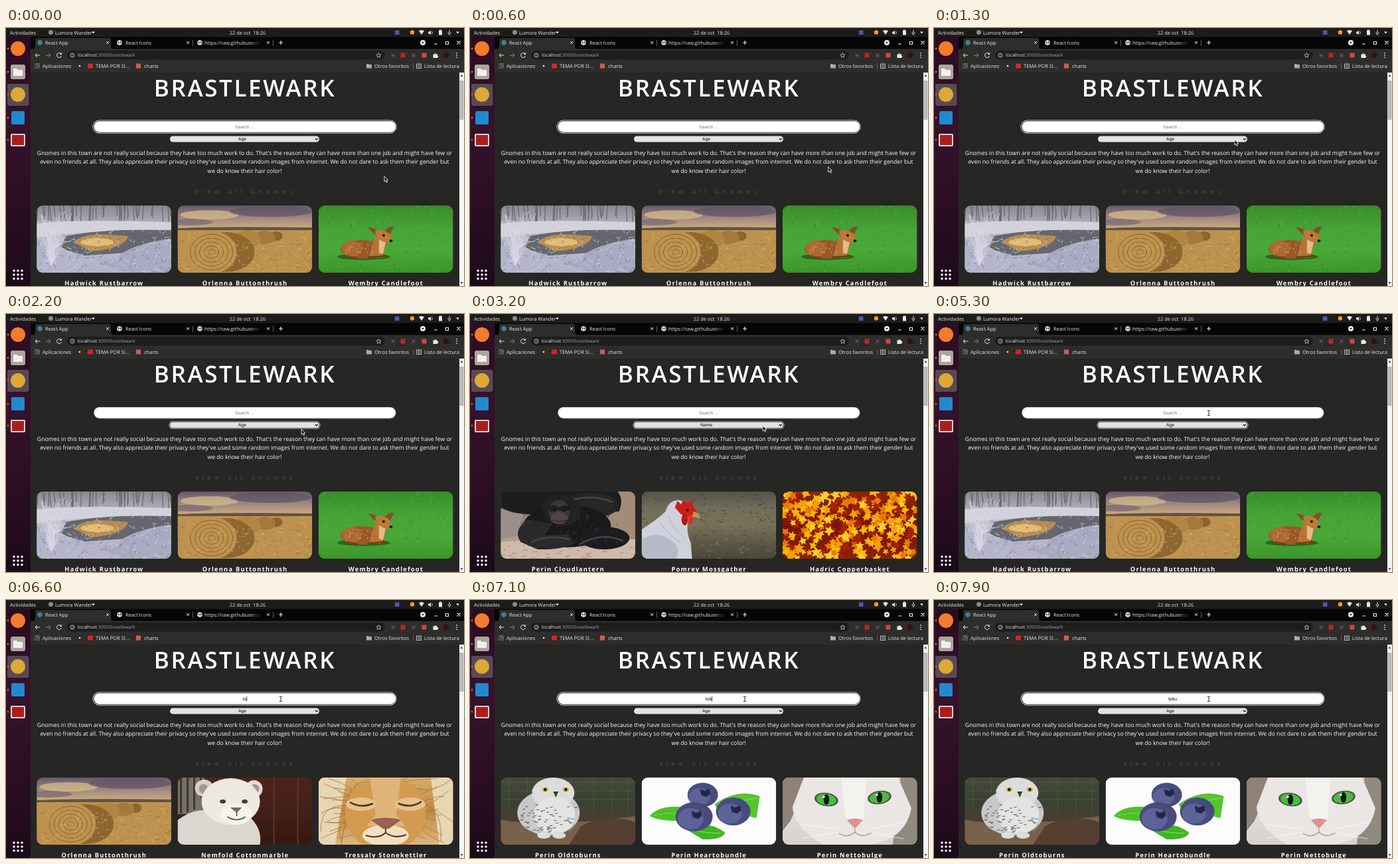
An HTML page that plays this animation: 690x388 px, repeating every 8 s.

```html
<!DOCTYPE html>
<html lang="es">
<head>
<meta charset="utf-8">
<title>Brastlewark</title>
<style>
html, body { margin: 0; width: 100%; height: 100%; overflow: hidden; background: #262624; }
svg { display: block; width: 690px; height: 388px; }
text { font: 7.5px 'Open Sans', 'Noto Sans', sans-serif; fill: #e8e8e8; text-rendering: geometricPrecision; white-space: pre; }
.bar { font-size: 7.4px; }
.mid { text-anchor: middle; }
.title { font-size: 35px; font-weight: 600; letter-spacing: 2.6px; fill: #fff; }
.intro { font-size: 8.63px; fill: #fff; }
.view { font-size: 8.5px; letter-spacing: 5.8px; fill: #51514e; }
.name { font-size: 9.4px; font-weight: 700; letter-spacing: 1.2px; fill: #fff; }
.field { font: 6.73px 'Liberation Sans', Arial, sans-serif; fill: #000; }
.line { fill: none; stroke: #e8e8e8; }
</style>
</head>
<body>
<svg viewBox="0 0 690 388">
  <defs>
    <linearGradient id="dockFill" x2="0" y2="1">
      <stop stop-color="#2a0d20"/><stop offset=".35" stop-color="#36122d"/><stop offset=".7" stop-color="#2a0d24"/><stop offset="1" stop-color="#1b0a18"/>
    </linearGradient>
    <linearGradient id="fade"><stop offset=".8" stop-color="#e8e8e8"/><stop offset="1" stop-color="#e8e8e8" stop-opacity="0"/></linearGradient>
    <clipPath id="card"><rect width="202.5" height="101" rx="9"/></clipPath>
  </defs>
  <rect width="690" height="388" fill="#262624"/>

  <!-- page -->
  <text class="title mid" x="360" y="103">BRASTLEWARK</text>
  <g id="searchRing"><rect x="130.5" y="138.5" width="458" height="20" rx="10" fill="#fff"/><rect x="131.3" y="139.3" width="456.4" height="18.4" rx="9.2" fill="#101010"/></g>
  <rect x="132.5" y="140.5" width="455" height="17" rx="8.5" fill="#8d8d8b"/>
  <rect x="132.5" y="140.2" width="454.5" height="16.2" rx="8.1" fill="#fff"/>
  <text id="query" class="field mid" x="359.5" y="151"></text>
  <rect id="caret" y="145" width=".7" height="7.5"/>
  <g id="selectRing"><rect x="245.5" y="161" width="228" height="12" rx="6" fill="#fff"/><rect x="246.1" y="161.6" width="226.8" height="10.8" rx="5.4" fill="#101010"/></g>
  <rect x="247" y="162.5" width="225" height="9" rx="4.5" fill="#e0e3df"/>
  <text id="sort" class="field mid" x="356" y="169.4"></text>
  <path d="M466 166l2 2 2-2" fill="none" stroke="#111" stroke-width="1.1"/>
  <g class="mid">
    <text class="intro" x="359.5" y="191">Gnomes in this town are not really social because they have too much work to do. That's the reason they can have more than one job and might have few or</text>
    <text class="intro" x="359.5" y="204.3">even no friends at all. They also appreciate their privacy so they've used some random images from internet. We do not dare to ask them their gender but</text>
    <text class="intro" x="359.5" y="217.5">we do know their hair color!</text>
  </g>
  <text class="view" x="285" y="249">View all Gnomes</text>
  <g id="cards"></g>
  <path d="M683 67h7v321h-7z" fill="#f4f4f4"/><path d="M683.5 79h6v59h-6z" fill="#b9b9b9"/>
  <path d="M684.5 73l2-3 2 3zM684.5 382l2 3 2-3z" fill="#444"/>

  <!-- browser -->
  <path d="M37 13h653v19H37z" fill="#060606"/>
  <path d="M37 31.5h5q2-1 2-4V18q0-3 3-3h108q3 0 3 3v9.5q0 3 3 4h529V67H37z" fill="#2d2d2c"/>
  <path d="M281.5 18v9M402.5 18v9M613.5 53v9" stroke="#5b5c60"/>
  <circle cx="51" cy="22" r="3.7" fill="#3d8195"/>
  <text class="bar" x="59" y="24.8">React App</text>
  <text class="bar" x="180" y="24.8">React Icons</text>
  <text class="bar" x="299" y="24.8" style="fill:url(#fade)">https://raw.githubuserco</text>
  <g id="marks"></g>
  <path class="line" d="M411 22h6M414 19v6M645 24h5M662.5 20.5h4v4h-4zM679.5 19.5l5 5m0-5l-5 5" stroke-width="1.2"/>
  <circle cx="628" cy="22" r="4" fill="#e8e8e8"/><path d="M626 21h4l-2 2.5z" fill="#222"/>
  <path class="line" d="M51 41h-7m3-3l-3 3 3 3M83 39a3.5 3.5 0 1 0 .5 3M83.5 37v2.5h-2.5"/>
  <path class="line" d="M60 41h7m-3-3l3 3-3 3" style="stroke:#88898c"/>
  <rect x="92" y="34" width="479" height="13.5" rx="6.7" fill="#1d1d1c"/>
  <circle class="line" cx="100" cy="41" r="3" stroke-width=".8"/><path class="line" d="M100 40.5v2M100 39v.7" stroke-width=".8"/>
  <text x="108" y="43.4" style="font-size:6.9px">localhost<tspan fill="#9aa0a6">:3000/brastlewark</tspan></text>
  <path class="line" d="M561.5 37.5l1 2.4 2.5.2-1.9 1.7.6 2.5-2.2-1.4-2.2 1.4.6-2.5-1.9-1.7 2.5-.2z" stroke-width=".7"/>
  <path d="M581 39h5v4h-5zM611.5 38.5h5v5h-5z" fill="#4b4b4d"/>
  <path d="M594.5 37.5h7v7h-7z" fill="#c02323"/>
  <path d="M626.5 37.5h7v7h-7z" fill="#d14545"/>
  <path d="M643.5 39.5h2a1.3 1.3 0 1 1 2.6 0h2v2a1.3 1.3 0 1 1 0 2.6v1h-6.6z" fill="#e8e8e8"/>
  <circle cx="663" cy="41" r="4.5" fill="#35100f"/>
  <path d="M679 37v1.5M679 40.2v1.5M679 43.4v1.5" stroke="#e8e8e8" stroke-width="1.5"/>
  <text x="55" y="59.8">Aplicaciones</text>
  <circle cx="111" cy="57" r="1.3" fill="#e8e8e8"/>
  <rect x="123" y="53.5" width="8" height="7" rx="1.5" fill="#e02020"/>
  <text x="135" y="59.8">TEMA POR SI…</text>
  <rect x="196" y="53.5" width="7" height="7" fill="#d9584f"/>
  <text x="208" y="59.8">charts</text>
  <path d="M543 54h3l1 1h4v5.5h-8z" fill="#aaabae"/>
  <text x="555" y="59.8">Otros favoritos</text>
  <path class="line" d="M618.5 54h7v6.5h-7zM620 56h4M620 58.2h4" stroke-width=".8"/>
  <text x="630" y="59.8">Lista de lectura</text>

  <!-- desktop -->
  <path d="M0 13h37v375H0z" fill="url(#dockFill)"/>
  <path d="M0 0h690v13.5H0z" fill="#1c1c1b"/>
  <text class="bar" x="6" y="9.6">Actividades</text>
  <circle cx="67.5" cy="6.5" r="3.5" fill="#8a8a8a"/>
  <text class="bar" x="74" y="9.6">Lumora Wander</text>
  <path d="M129 5.5h5l-2.5 3zM678 5.5h5l-2.5 3z" fill="#e8e8e8"/>
  <text class="bar mid" x="364" y="9.6">22 de oct  18:26</text>
  <path d="M586 3.5h6.5V10H586z" fill="#4f57b8"/><circle cx="612" cy="6.5" r="3.2" fill="#f39a2d"/>
  <path d="M622 4.5q4-3 8 0l-4 5.5zM636 5.5h2l2-2v7l-2-2h-2zM652 3.5h1.5v-1h2v1h1.5v7h-5z" fill="#e8e8e8"/>
  <path class="line" d="M641.5 5q1.5 2 0 4M668 3v4M666 6q0 3 2 3t2-3M668 9v2" stroke-width=".9"/>
  <rect x="2" y="84" width="32.5" height="33" rx="3" fill="#564a56"/>
  <circle cx="18" cy="31" r="11" fill="#f47b2b"/>
  <rect x="7" y="55" width="22" height="22" rx="3" fill="#aaa59e"/><path d="M11 61h5l2 2h7v9H11z" fill="#f2f0eb"/>
  <circle cx="18" cy="100" r="11" fill="#dca934"/>
  <rect x="8" y="125" width="20" height="20" rx="2" fill="#2289cf"/>
  <rect x="7" y="159" width="22" height="19" rx="2" fill="#ded7d2"/><rect x="9" y="161" width="18" height="15" fill="#ad1d20"/>
  <g id="dots"></g>

  <g id="pointer">
    <path id="arrow" d="M0 0v8l1.9-1.7L3.3 9.4l1.3-.6L3.2 5.8h2.5z" fill="#111" stroke="#fff" stroke-width=".8"/>
    <path id="beam" d="M-2-3.5h1.5q.5 0 .5.5V3q0 .5.5.5H2M-2 3.5h1.5Q0 3.5 0 3M0-3q0-.5.5-.5H2" fill="none" stroke="#222"/>
  </g>
</svg>
<script>
const $ = id => document.getElementById(id);

// drawing helpers
const ell = (x, y, rx, ry, fill, more = '') => `<ellipse cx="${x}" cy="${y}" rx="${rx}" ry="${ry}" fill="${fill}" ${more}/>`;
const shape = (d, fill, more = '') => `<path d="${d}" fill="${fill}" ${more}/>`;
const stroke = (d, color, w = 1) => `<path d="${d}" fill="none" stroke="${color}" stroke-width="${w}"/>`;
const turn = (a, x, y) => `transform="rotate(${a} ${x} ${y})"`;
const pair = (x1, x2, draw) => draw(x1) + draw(x2);
function sky(id, ...colors) {
  const stops = colors.map((c, i) => `<stop offset="${i / (colors.length - 1)}" stop-color="${c}"/>`).join('');
  return `<linearGradient id="${id}" x2="0" y2="1">${stops}</linearGradient><rect width="203" height="101" fill="url(#${id})"/>`;
}
function scatter(n, seed, draw) {
  const pick = (a, b) => a + (b - a) * ((seed = seed * 16807 % 2147483647) / 2147483647);
  let out = '';
  for (let i = 0; i < n; i++) out += draw(pick, i);
  return out;
}
const blades = (n, seed, top, color, dx, dy, w = .7) => stroke(scatter(n, seed, p =>
  `M${p(0, 203).toFixed(1)} ${p(top, 101).toFixed(1)}l${p(-dx, dx).toFixed(1)} ${p(-dy, dy).toFixed(1)}`), color, w);

const photos = {
  snow: sky('snowBg', '#898891', '#b9b9c4', '#bfc0d2', '#9b9cb4') +
    stroke(scatter(38, 771, p => `M${p(0, 203)} 0l${p(-3, 3)} ${p(14, 27)}`), '#66646d', 1.2) +
    shape('M0 27Q60 20 203 25V42Q90 34 0 48z', '#d2d2dd') +
    shape('M44 46Q100 34 203 37V52Q150 56 134 71L62 76 36 62z', '#66666f') +
    shape('M57 56Q62 44 100 43L138 46Q132 65 82 69z', '#b98d4f') + ell(91, 55, 25, 6, '#e2bd72') +
    shape('M128 72Q156 55 203 50V101H112z', '#a9aac3') + shape('M0 60Q50 65 90 82L130 101H0z', '#b4b5cb') +
    blades(130, 88, 38, '#dcdde9', 7, 5) + blades(110, 413, 44, '#74758c', 6, 6) +
    stroke(scatter(30, 901, p => `M22 90Q${p(5, 45)} 60 ${p(0, 55)} ${p(8, 60)}`), '#d8d9e4', .8),
  hay: sky('hayBg', '#655869', '#a68d83', '#d9b979', '#bd914b', '#9d7338', '#b88b46') +
    ell(48, 14, 44, 7, '#d7c08a', 'opacity=".7"') + ell(140, 9, 62, 8, '#5f5366', 'opacity=".7"') + ell(18, 25, 35, 5, '#786776', 'opacity=".7"') +
    shape('M0 34Q70 31 203 33V37H0z', '#665241') + shape('M0 37h203v64H0z', '#bd924f') +
    blades(150, 55, 39, '#dfba74', 5, 2) + blades(100, 77, 50, '#8d6732', 5, 2) +
    ell(149, 46, 9, 7, '#8a6533') + ell(131, 48, 16, 10, '#a27a3d') + ell(105, 51, 20, 14, '#b18643') +
    ell(73, 70, 43, 30, '#8d672f') + ell(51, 70, 38, 32, '#bd914e') +
    [32, 25, 18, 11, 5].map(r => `<ellipse cx="51" cy="70" rx="${r}" ry="${r * .84}" fill="none" stroke="#8b632b"/>`).join('') +
    stroke(scatter(65, 99, p => `M${p(16, 106)} ${p(49, 91)}l${p(-5, 5)} ${p(-4, 4)}`), '#dcb66d', .7),
  deer: sky('deerBg', '#398d2c', '#46a335', '#4aa838', '#3c9429') +
    blades(150, 61, 0, '#64bb49', 1, 4) + blades(120, 21, 0, '#2d7e23', 1, 4) +
    ell(68, 77, 40, 5, '#28691f') + ell(65, 66, 32, 14, '#9c5728') + ell(50, 65, 15, 12, '#ae6832') +
    shape('M79 67L87 42 105 44 99 70 93 79 76 77z', '#b97338') +
    shape('M74 33Q84 32 92 42L84 43zM99 39Q106 30 114 32L108 43z', '#80502e') +
    shape('M85 39Q94 33 106 42L111 53 104 56 90 50z', '#bd783c') +
    shape('M91 51l10 5-4 17-6-2z', '#e4bc88') + ell(98, 45, 2, 2, '#211610') + ell(109, 53, 2.5, 2, '#221815') +
    scatter(22, 45, p => ell(p(42, 82), p(57, 72), .9, .7, '#e0b384')) + stroke('M74 78l28-2M42 76l18 4', '#744020', 3),
  chimp: sky('chimpBg', '#3d3a39', '#85796f', '#b09a88', '#cdb7a4') +
    shape('M158 0H203V76Q172 62 158 40z', '#a28b79') + shape('M0 26Q18 20 34 34L26 66 0 72z', '#9a8f89') +
    shape('M0 76Q75 68 203 72V101H0z', '#cfb9a8') + blades(60, 29, 74, '#a38a7c', 9, 1.5, 1) +
    shape('M0 0H176Q186 12 178 30L60 34Q20 36 0 24z', '#1d1c1e') + ell(134, 21, 44, 19, '#262528') +
    ell(100, 52, 66, 32, '#19181b') + ell(92, 28, 29, 24, '#222124') + ell(156, 70, 38, 17, '#1c1b1e') +
    shape('M40 42Q18 58 30 76L56 87Q92 88 112 78L100 64 66 66 78 48z', '#29282b') +
    ell(88, 30, 16, 17, '#3c3735') + ell(88, 40, 13, 9, '#4d4643') +
    shape('M71 24Q80 17 88 24Q97 17 106 25L102 29 88 28 74 30z', '#1f1d1e') + pair(81, 95, x => ell(x, 29, 2, 1, '#0d0c0d')) +
    stroke('M78 43Q88 47 99 43', '#211d1c') + stroke('M46 76Q72 64 104 72M118 80Q150 60 184 74M110 12Q140 4 168 16', '#454448', 2.5) +
    stroke(scatter(70, 83, p => `M${p(34, 180)} ${p(34, 80)}l${p(-5, 5)} ${p(2, 6)}`), '#3b3a3e', .8),
  hen: sky('henBg', '#565348', '#726c5a', '#777059', '#5f5946', '#4a4638') +
    blades(130, 13, 30, '#8e866d', 6, 3) + blades(120, 43, 5, '#45433a', 6, 3, 1) +
    shape('M0 57Q22 43 36 30Q41 12 57 13Q72 17 72 38Q65 57 74 77L76 101H0z', '#cfd2dc') +
    shape('M0 72Q22 58 46 74Q60 88 51 101H0z', '#b6bac8') + stroke('M40 36Q46 55 65 70M28 47Q42 68 59 77', '#adb1c0', 1) +
    shape('M50 24L54 14 59 19 64 12 68 17 76 14 78 23 84 31 73 39 59 34z', '#c91f1b') +
    ell(65, 42, 5, 9, '#b31b1b') + ell(74, 42, 4, 8, '#d7302b') + shape('M78 30Q87 32 89 40L76 38z', '#b89359') + ell(69, 28, 2, 2, '#271109'),
  leaves: sky('leafBg', '#8e2403', '#781402', '#8b2203') +
    scatter(280, 337, (p, i) => shape('M0-8L2-3 7-4 4 1 6 6 0 4-6 6-4 1-7-4-2-3z',
      ['#fbb60a', '#e67a05', '#ffcf2b', '#a52203', '#f59f08'][i % 5],
      `transform="translate(${p(0, 203).toFixed(1)} ${p(0, 101).toFixed(1)}) rotate(${p(0, 360).toFixed()}) scale(${p(.6, 1.15).toFixed(2)})"`)),
  cub: sky('cubBg', '#4c2319', '#44201a', '#35170f') + shape('M0 0H40V55H0z', '#787169') + stroke('M5 0V54M15 0V52M25 0V48M35 0V30', '#3d3530', 3) +
    stroke('M145 0V101M181 0V101', '#653020', 2) + shape('M0 64Q27 44 49 51L107 58Q128 76 124 101H0z', '#dad7cf') +
    ell(40, 16, 14, 13, '#d5cfc4') + ell(115, 17, 13, 13, '#e2dcd1') + pair(39, 116, x => ell(x, 17, 7, 7, '#a6978c')) +
    ell(80, 36, 44, 35, '#ece9e1') + ell(88, 55, 24, 16, '#f6f3ed') +
    pair(68, 101, x => ell(x, 36, 4.5, 3, '#493b30')) + shape('M79 45h18l-8 8z', '#80655c') + stroke('M89 52v6M75 59q14 9 27 0', '#58463e', 1.6),
  lion: sky('lionBg', '#d6ad6d', '#c48b45', '#d9b680') + shape('M0 0H42L25 101H0zM169 0h34v101h-21z', '#e7d6b4') +
    stroke(scatter(85, 171, p => `M${p(45, 157)} ${p(10, 75)}Q${p(-10, 213)} ${p(10, 80)} ${p(0, 203)} ${p(0, 101)}`), '#ae7435', .8) +
    ell(101, 54, 61, 56, '#d49a50') + shape('M77 0h47l-7 56 14 17H72l14-17z', '#dfb478') +
    pair(64, 138, x => ell(x, 40, 23, 10, '#e5c28c')) + stroke('M47 37Q64 47 82 39M120 39Q140 47 155 36', '#50311f', 2.5) +
    shape('M81 63Q101 58 122 63L105 76H98z', '#8e5946') + ell(101, 87, 35, 16, '#f0e0c1') +
    shape('M79 64Q101 58 124 64L106 77H97z', '#986151') + stroke('M101 76v7M71 87Q90 93 101 83Q115 93 132 86', '#51321f', 2),
  owl: sky('owlBg', '#454b38', '#3a4033', '#49402f', '#6f5943') + stroke('M0 7H203M0 20H203M0 33H203M12 0V50M40 0V50M140 0V55M167 0V55M192 0V55', '#5b5f4b', .7) +
    shape('M0 64Q78 75 203 58V101H0z', '#77614b') + shape('M121 73Q158 52 203 67V101H103z', '#553f30') +
    ell(72, 53, 47, 34, '#c8c9c7') + ell(79, 23, 32, 23, '#dcdcda') + ell(81, 57, 31, 28, '#e3e3e0') +
    stroke(scatter(75, 53, p => `M${p(29, 114)} ${p(40, 82)}q2 2 4 0`), '#74777a', 1.1) +
    pair(67, 98, x => ell(x, 18, 5, 3.5, '#d8b72c') + ell(x, 18, 2.2, 2.5, '#171715')) + shape('M79 21h8l-4 9z', '#393a37') +
    pair(65, 88, x => ell(x, 87, 10, 5, '#dddcd6')),
  berry: '<rect width="203" height="101" fill="#fcfcfc"/>' + shape('M12 58Q29 38 74 46L88 60Q38 71 12 58z', '#4fc027') +
    shape('M110 40Q144 16 178 28L173 61Q142 53 119 58z', '#55c62d') + shape('M64 76Q98 62 126 83Q121 94 92 93z', '#43b522') +
    stroke('M18 57Q58 48 85 59M115 46Q148 34 174 31M70 79Q94 83 120 84', '#85dc5e', 1) +
    [[92, 26, 23, 18], [138, 51, 26, 21], [79, 59, 28, 22]].map(([x, y, a, b]) => ell(x, y, a, b, '#474b7e') +
      ell(x - 5, y + 3, a * .7, b * .72, '#5d6397') + shape(`M${x - 4} ${y - 9}l7 3 7-3 2 7-6 5-8-2z`, '#23264c')).join(''),
  cat: sky('catBg', '#cac4bd', '#dfdbd6', '#d7d1cb') + shape('M0 0H40L12 65 0 80z', '#8e8177') + shape('M178 0H203V101H166z', '#918a81') +
    shape('M32 0H174L194 46Q185 94 129 101H62Q17 77 15 44z', '#e9e6e3') + shape('M88 0h38l-4 61-13 7-14-7z', '#f4f2ef') +
    [[66, 33, 9], [146, 30, -9]].map(([x, y, a]) => ell(x, y, 18, 10, '#50524a', turn(a, x, y)) +
      ell(x, y, 15, 8.5, '#49bd41', turn(a, x, y)) + ell(x, y, 4.2, 8, '#111713') + ell(x - 4, y - 4, 2, 1.5, '#fff')).join('') +
    shape('M97 64Q109 59 121 64L111 75H107z', '#da9590') + stroke('M109 74v8M85 84Q98 92 109 82Q120 92 134 83', '#a8948b', 1.3) +
    stroke('M82 77L27 70M84 82L30 91M134 77l52-10M134 83l48 9', '#fff', .7)
};

const lists = {
  age: { snow: 'Hadwick Rustbarrow', hay: 'Orlenna Buttonthrush', deer: 'Wembry Candlefoot' },
  name: { chimp: 'Perin Cloudlantern', hen: 'Pomrey Mossgather', leaves: 'Hadric Copperbasket' },
  to: { hay: 'Orlenna Buttonthrush', cub: 'Nemfold Cottonmarble', lion: 'Tressaly Stonekettler' },
  tob: { owl: 'Perin Oldtoburns', berry: 'Perin Heartobundle', cat: 'Perin Nettobulge' }
};

$('cards').innerHTML =
  '<defs>' + Object.entries(photos).map(([id, art]) => `<g id="${id}" clip-path="url(#card)">${art}</g>`).join('') + '</defs>' +
  Object.entries(lists).map(([key, list]) => `<g id="list-${key}">` + Object.entries(list).map(([id, name], i) =>
    `<use href="#${id}" x="${46.3 + i * 212.3}" y="267"/><text class="name mid" x="${147.8 + i * 212.3}" y="387">${name}</text>`).join('') + '</g>').join('');

// small repeated marks: tab crosses, globes, dock dots, app grids
const grid = (x, y, step, r, color) => [...Array(9).keys()].map(i =>
  ell(x + (i % 3 - 1) * step, y + (Math.floor(i / 3) - 1) * step, r, r, color(i))).join('');
$('marks').innerHTML =
  [153, 274, 395].map(x => stroke(`M${x - 2} 20l4 4m0-4l-4 4`, '#e8e8e8', .9)).join('') +
  [171, 292].map(x => ell(x, 22, 3.8, 3.8, '#e4e4e4') + shape(`M${x - 3} 20l3 1-1 3zM${x + 1} 19l2 3-2 2z`, '#444')).join('') +
  grid(47, 57, 2.7, 1, i => ['#df4b3f', '#e8b53a', '#4aa35b', '#4d83dd'][i % 4]);
$('dots').innerHTML = [31, 66, 100, 135, 168].map(y => ell(3, y, 1.4, 1.4, '#e95420')).join('') + grid(18, 371, 6, 1.8, () => '#f2f2f2');

// [time, x, y]
const path = [[0, 570, 223], [300, 570, 223], [1200, 453, 168], [1900, 453, 168], [2400, 441, 176], [2800, 441, 168], [3500, 441, 168],
  [4200, 428, 183], [4500, 428, 183], [4700, 430, 168], [4900, 428, 172], [5200, 414, 149], [8000, 414, 149]];
const keys = [[6200, 't'], [6500, 'to'], [7000, 'tob'], [7300, 'tobu']];

function pointerAt(t) {
  const i = path.findIndex(p => p[0] > t);
  const [t0, x0, y0] = path[i - 1], [t1, x1, y1] = path[i];
  const u = (t - t0) / (t1 - t0), k = u * u * (3 - 2 * u);
  return [x0 + (x1 - x0) * k, y0 + (y1 - y0) * k];
}
const show = (id, on) => $(id).style.display = on ? '' : 'none';

function draw(now) {
  const t = Math.floor(now % 8000 / 100) * 100;
  const [since, typed] = keys.findLast(k => k[0] <= t) || [5600, ''];
  const byName = t >= 2500 && t < 4900;
  const searching = t < 1900 || t >= 5600;

  $('query').textContent = typed || 'Search ...';
  $('query').style.fill = typed ? '#000' : '#777';
  $('sort').textContent = byName ? 'Name' : 'Age';
  show('searchRing', searching);
  show('selectRing', t >= 1900 && t < 3900 || t >= 4700 && t < 5600);
  show('caret', t >= 5600 && (t - since) % 1000 < 500);
  $('caret').setAttribute('x', 359.7 + (typed ? $('query').getComputedTextLength() / 2 : 0));

  const current = typed.length > 2 ? 'tob' : typed === 'to' ? 'to' : byName ? 'name' : 'age';
  for (const key in lists) show('list-' + key, key === current);

  const [x, y] = pointerAt(t);
  const overField = y > 140 && y < 157;
  $('pointer').setAttribute('transform', `translate(${x} ${y})`);
  show('arrow', !overField);
  show('beam', overField);
  requestAnimationFrame(draw);
}
draw(0);
</script>
</body>
</html>
```
